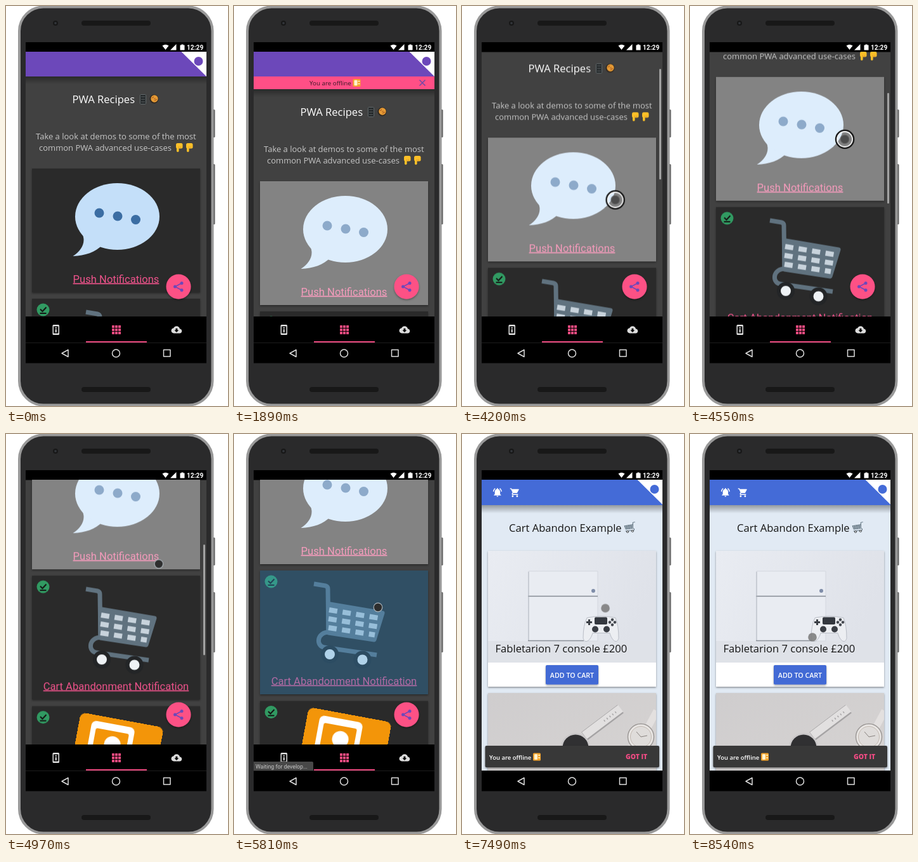
Recreate the animation shown at these times as an HTML page. Size 350 px wide and 630 px high, loop 8610 ms.

```html
<!DOCTYPE html>
<html lang="en">
<head>
<meta charset="utf-8">
<title>PWA Recipes demo</title>
<style>
html, body { margin: 0; width: 100%; height: 100%; overflow: hidden; background: #fff; }
svg { display: block; width: 350px; height: 630px; }
text { font-family: "Open Sans", "Noto Sans", sans-serif; }
.roboto { font-family: Roboto, Arial, sans-serif; }
.title { font-size: 16.6px; }
.para { font-size: 13px; fill: #c6c6c6; }
.small { font-size: 9.8px; }
.label {
  font-size: 16.6px; fill: #ee538b; text-anchor: middle;
  text-decoration: underline; text-decoration-color: #6350dc;
}

/* One 8610 ms clock drives every part. */
.anim { animation: 8610ms linear infinite; }
.push { animation-name: push; }
.banner { animation-name: banner; }
.dim { animation-name: dim; }
.scroll { animation-name: scroll; }
.thumb { animation-name: thumb; }
.bar { animation-name: bar; }
.press { animation-name: press; }
.tip { animation-name: tip; }
.shop { animation-name: shop; }
.snack { animation-name: snack; }
.cursor { animation-name: cursor; }
.ring { animation-name: ring; }
.dot { animation-name: dot; }
.press, .tip, .shop, .ring, .dot { animation-timing-function: step-end; }

@keyframes push {
  0%, 9.76% { transform: translateY(0); animation-timing-function: ease-out; }
  13.01%, 100% { transform: translateY(20px); }
}
@keyframes banner {
  0%, 9.76% { transform: translateY(-20px); animation-timing-function: ease-out; }
  13.01%, 100% { transform: translateY(0); }
}
@keyframes dim {
  0%, 9.76% { opacity: 0; }
  13.01%, 100% { opacity: .42; }
}
@keyframes scroll {
  0%, 43.9% { transform: translateY(0); animation-timing-function: cubic-bezier(.4, 0, .7, .75); }
  52.85% { transform: translateY(-164px); animation-timing-function: cubic-bezier(.2, .6, .4, 1); }
  60.98%, 100% { transform: translateY(-266px); }
}
@keyframes thumb {
  0%, 43.9% { transform: translateY(0); animation-timing-function: cubic-bezier(.4, 0, .7, .75); }
  52.85% { transform: translateY(65px); animation-timing-function: cubic-bezier(.2, .6, .4, 1); }
  60.98%, 100% { transform: translateY(105.5px); }
}
@keyframes bar {
  0%, 43.9% { opacity: 0; }
  44.7%, 60.98% { opacity: 1; }
  63.9%, 100% { opacity: 0; }
}
@keyframes press { 0% { opacity: 0; } 65.85%, 100% { opacity: 1; } }
@keyframes tip { 0% { opacity: 0; } 65.85% { opacity: 1; } 80.5%, 100% { opacity: 0; } }
@keyframes shop { 0% { visibility: hidden; } 70.73%, 100% { visibility: visible; } }
@keyframes snack {
  0%, 71.5% { transform: translateY(44px); animation-timing-function: ease-out; }
  74.1%, 100% { transform: translateY(0); }
}
@keyframes cursor {
  0%, 36.58% { transform: translate(302px, 400px); opacity: 0; }
  36.6% { transform: translate(302px, 400px); opacity: 1; animation-timing-function: ease-out; }
  41.46% { transform: translate(208px, 355px); animation-timing-function: ease-in-out; }
  43.9% { transform: translate(240px, 374px); animation-timing-function: cubic-bezier(.4, 0, .7, .75); }
  52.85% { transform: translate(244px, 210px); animation-timing-function: ease-out; }
  55.3% { transform: translate(245px, 184px); animation-timing-function: ease-in-out; }
  62.6%, 85.9% { transform: translate(227px, 273px); animation-timing-function: ease-in-out; }
  95.1%, 100% { transform: translate(193px, 320px); opacity: 1; }
}
@keyframes ring { 0% { opacity: 0; } 43.9% { opacity: 1; } 54.4%, 100% { opacity: 0; } }
@keyframes dot {
  0% { fill: rgba(68, 72, 80, .8); stroke: #4a5059; }
  43.9% { fill: rgba(70, 70, 70, .9); stroke: #666; }
  54.4% { fill: #2e2e2e; stroke: #aab2b8; }
  70.73%, 100% { fill: rgba(120, 120, 120, .85); stroke: transparent; }
}
</style>
</head>
<body>
<svg viewBox="0 0 350 630">
<defs>
  <clipPath id="screen"><rect x="31" y="72.5" width="285" height="458"/></clipPath>
  <clipPath id="column"><rect x="41" y="184" width="265" height="350"/></clipPath>
  <linearGradient id="shade" x2="0" y2="1">
    <stop stop-opacity=".35"/><stop offset="1" stop-opacity="0"/>
  </linearGradient>
  <linearGradient id="wall" x2="1" y2=".3">
    <stop stop-color="#e9ecf2"/><stop offset="1" stop-color="#dfe2e9"/>
  </linearGradient>
  <linearGradient id="desk" x2="1" y2="1">
    <stop stop-color="#cfcdce"/><stop offset="1" stop-color="#d6d3d2"/>
  </linearGradient>
  <filter id="soft" x="-20%" y="-20%" width="140%" height="150%">
    <feDropShadow dx="0" dy="1.5" stdDeviation="1.5" flood-opacity=".4"/>
  </filter>

  <g id="card"><rect x="41" width="265" height="195" fill="#2c2c2c" filter="url(#soft)"/></g>

  <g id="badge">
    <circle cx="58.5" cy="17.5" r="10" fill="#319a62"/>
    <path d="M54 16.5l3.5 3.5 6-6.5M53.500 23h10" fill="none" stroke="#151515" stroke-width="2"/>
  </g>

  <g id="hand" fill="#fcc028">
    <rect x="-5" y="-7" width="10.5" height="8.5" rx="2.5"/>
    <rect x="-4" y="-3" width="3.6" height="10" rx="1.8"/>
    <path d="M-.4 1.5V-2M2.4 1.5V-2" stroke="#d8932a" stroke-width=".8"/>
  </g>

  <g id="off">
    <rect x="-6" y="-6" width="12" height="12" rx="1.5" fill="#f5a32b"/>
    <rect x="-4" y="-4.2" width="5" height="8.4" rx="1" fill="#fff3cf"/>
    <path d="M2 -2.5h3M2 1.5h3" stroke="#fff3cf" stroke-width="1.6"/>
  </g>

  <path id="trolley" d="M7 18c-1.1 0-1.99.9-1.99 2S5.9 22 7 22s2-.9 2-2-.9-2-2-2zM1 2v2h2l3.6 7.59-1.35 2.45c-.16.28-.25.61-.25.96 0 1.1.9 2 2 2h12v-2H7.42c-.14 0-.25-.11-.25-.25l.03-.12.9-1.63h7.45c.75 0 1.41-.41 1.75-1.03l3.58-6.49A1 1 0 0 0 20 4H5.21l-.94-2H1zm16 16c-1.1 0-1.99.9-1.99 2s.89 2 1.99 2 2-.9 2-2-.9-2-2-2z"/>

  <!-- Large cart picture, y measured from the top of its card -->
  <g id="cart" fill="none" stroke="#60727f" stroke-linejoin="round">
    <path d="M126 21l18 3q4 1 4 5l1 70" stroke-width="7"/>
    <path d="M148.500 52.500L234 67 221 109 149 98z" fill="#60727f" stroke-width="7"/>
    <path d="M150 97C130 97 129 119 142 121L225 133" stroke-width="7"/>
    <g stroke="#c8d3dc" stroke-width="8" stroke-dasharray="13 8.5">
      <path d="M150 62l79 13M149 76l77 12.500M149 90l73 11.500"/>
    </g>
    <g fill="#eef2f5" stroke="#232527" stroke-width="6">
      <circle cx="151" cy="132" r="11"/><circle cx="202.500" cy="140.500" r="11"/>
    </g>
  </g>
</defs>

<!-- Handset -->
<g fill="#626262">
  <rect x="325" y="163" width="4.500" height="44" rx="1.500"/>
  <rect x="325" y="249" width="4.500" height="95" rx="1.500"/>
</g>
<rect x="21" y="1.5" width="304.5" height="627" rx="38" fill="#2a2a2b" stroke="#999" stroke-width="4"/>
<g fill="#181818">
  <rect x="119" y="23" width="109" height="8" rx="4"/>
  <rect x="119" y="600" width="109" height="8" rx="4"/>
  <circle cx="78" cy="27" r="4"/>
</g>
<circle cx="78" cy="27" r="1.8" fill="#34373d"/>
<rect x="31" y="57" width="285" height="505.5"/>

<g clip-path="url(#screen)">
  <!-- Recipe list -->
  <rect x="31" y="72" width="286" height="417" fill="#414141"/>
  <g class="anim scroll">
    <g class="anim push">
      <rect x="31" y="111" width="286" height="12" fill="url(#shade)"/>
      <text class="title" x="104.5" y="152.5" fill="#fff">PWA Recipes</text>
      <rect x="211.5" y="139.5" width="9" height="15" rx="1" fill="#24282a" stroke="#626a6c"/>
      <path d="M213.5 143h5M213.5 147h5M213.5 151h5" stroke="#788082" stroke-width="1.2" stroke-dasharray="2 1"/>
      <circle cx="233.5" cy="146.5" r="7" fill="#302820"/>
      <circle cx="234" cy="146" r="5.7" fill="#e69b35"/>
      <path d="M230 145l3-2M234 149l4-2M233 146h3" stroke="#a95c22" stroke-width="1.2"/>
      <text class="para" x="47" y="209.5">Take a look at demos to some of the most</text>
      <text class="para" x="52" y="227.5">common PWA advanced use-cases</text>
      <use href="#hand" x="273" y="223"/><use href="#hand" x="289" y="223"/>

      <g transform="translate(0 256)">
        <use href="#card"/>
        <g fill="#c4dff9">
          <path d="M116 96C129 112 121 128 105.500 138 125 137 141 132 152 120z"/>
          <ellipse cx="175.500" cy="75.500" rx="66.500" ry="52.500"/>
        </g>
        <g fill="#3b6da3">
          <circle cx="147" cy="70" r="7.500"/><circle cx="176" cy="75" r="7.500"/><circle cx="204.500" cy="80.500" r="7.500"/>
        </g>
        <text class="label roboto" x="173.500" y="179.500">Push Notifications</text>
        <rect class="anim dim" x="41" width="265" height="195" fill="#fff"/>
      </g>

      <g transform="translate(0 461)">
        <use href="#card"/><use href="#badge"/><use href="#cart"/>
        <text class="label roboto" x="173.500" y="179.500">Cart Abandonment Notification</text>
        <rect class="anim press" x="41" width="265" height="195" fill="rgba(60,150,210,.35)"/>
      </g>

      <g transform="translate(0 666.500)">
        <use href="#card"/><use href="#badge"/>
        <g transform="translate(118 9.500) rotate(10.500)">
          <rect width="133" height="120" rx="9" fill="#f39509"/>
          <rect x="20" y="9" width="69" height="105" rx="8" fill="#fff"/>
          <rect x="28" y="20" width="53" height="84" rx="3" fill="#f39509"/>
          <circle cx="58" cy="41" r="13" fill="#fff"/>
        </g>
      </g>
    </g>

    <g class="anim banner">
      <rect x="31" y="111" width="286" height="20" fill="#ff4f86"/>
      <text class="small" x="119" y="124.500" fill="#3a1826">You are offline</text>
      <use href="#off" x="193.500" y="121"/>
      <path d="M292.500 116.500l9 9m0-9l-9 9" stroke="#6d48a8" stroke-width="1.500"/>
    </g>
    <rect x="31" y="72" width="286" height="39" fill="#6c48ba"/>
    <path d="M276.500 72h40v39.500z" fill="#fff"/>
    <circle cx="303.500" cy="87" r="7" fill="#6c48ba"/>
  </g>

  <g class="anim bar">
    <rect class="anim thumb" x="311" y="72" width="3" height="174" rx="1" fill="#a3a3a3"/>
  </g>

  <circle cx="272" cy="442" r="19.500" fill="#fd5185" filter="url(#soft)"/>
  <path d="M277 436.500l-10.500 5.500 10.500 5.500" fill="none" stroke="#6c48ba" stroke-width="1.500"/>
  <g fill="#6c48ba">
    <circle cx="277" cy="436.500" r="2.500"/><circle cx="266.500" cy="442" r="2.500"/><circle cx="277" cy="447.500" r="2.500"/>
  </g>

  <!-- Tabs -->
  <rect x="31" y="489" width="286" height="42"/>
  <rect x="73.500" y="502" width="10.500" height="16" rx="1.500" fill="#e4e4e4"/>
  <rect x="75" y="504.500" width="7.500" height="11"/>
  <path d="M78.750 506v2m0 1v5" stroke="#e4e4e4" stroke-width="2"/>
  <path d="M167 505h14M167 510h14M167 515h14" stroke="#f04b80" stroke-width="4" stroke-dasharray="4 1"/>
  <path transform="translate(260.500 501.500) scale(.7)" fill="#ddd" d="M19.350 10.040C18.670 6.590 15.640 4 12 4 9.110 4 6.600 5.640 5.350 8.040 2.340 8.360 0 10.910 0 14c0 3.310 2.690 6 6 6h13c2.760 0 5-2.240 5-5 0-2.640-2.050-4.780-4.650-4.960zM17 13l-5 5-5-5h3V9h4v4h3z"/>
  <path d="M126 529h96" stroke="#ed4a80" stroke-width="2"/>

  <!-- Shop page -->
  <g class="anim shop">
    <rect x="31" y="72" width="286" height="459" fill="#e1eaf4"/>
    <rect x="31" y="112" width="286" height="13" fill="url(#shade)"/>
    <rect x="31" y="72" width="286" height="40" fill="#446bd7"/>
    <path d="M276.500 72h40v39.500z" fill="#fff"/>
    <circle cx="303.500" cy="87" r="7" fill="#446bd7"/>
    <g fill="#fff">
      <path transform="translate(47.500 83.500) scale(.7)" d="M7.580 4.080L6.150 2.650C3.750 4.480 2.170 7.300 2.030 10.500h2c.150-2.650 1.510-4.970 3.550-6.420zm12.390 6.420h2c-.150-3.200-1.730-6.020-4.120-7.850l-1.420 1.430c2.020 1.450 3.390 3.770 3.540 6.420zM18 11c0-3.070-1.640-5.640-4.500-6.320V4c0-.830-.670-1.500-1.500-1.500s-1.500.670-1.500 1.500v.680C7.630 5.360 6 7.920 6 11v5l-2 2v1h16v-1l-2-2v-5zm-6 11a2 2 0 0 0 2-2h-4a2 2 0 0 0 2 2z"/>
      <use href="#trolley" transform="translate(75 84) scale(.7)"/>
    </g>
    <text class="title" x="74" y="153.500" fill="#161616">Cart Abandon Example</text>
    <use href="#cart" transform="translate(292 136) scale(-.153 .128)"/>

    <rect x="41" y="184" width="265" height="214" fill="#fff" filter="url(#soft)"/>
    <rect x="41" y="408" width="265" height="130" fill="url(#desk)" filter="url(#soft)"/>
    <g clip-path="url(#column)">
      <rect x="41" y="184" width="265" height="176" fill="url(#wall)"/>
      <path d="M41 326h265v34H41z" fill="#dfe2e8"/>
      <path d="M105 216h109v110H105z" fill="#e9ecf2" stroke="#d3d7df"/>
      <path d="M104 255.500h110" stroke="#858a93" stroke-width="1.500"/>
      <path d="M105 217v108" stroke="#b3b8c1"/>
      <path d="M104 325.500h88" stroke="#8d929a" stroke-width="1.500"/>
      <circle cx="207" cy="247" r="3" fill="#7f8da9"/>
      <path d="M197 289.500q22-5 45 0 5 12 5 32c-2 9-10 6-14-8h-27c-4 14-13 17-15 8q0-20 6-32z" fill="#eceef2" stroke="#b9bdc6"/>
      <rect x="209" y="288.500" width="20" height="11.500" rx="2" fill="#34383f"/>
      <g fill="#393d44">
        <circle cx="210" cy="307.500" r="5"/><circle cx="228" cy="307.500" r="5"/>
      </g>
      <path d="M196 296.500h9m-4.500-4.500v9" stroke="#3b3f46" stroke-width="3"/>
      <g fill="#42464d">
        <circle cx="237" cy="292.500" r="2.200"/><circle cx="237" cy="300.500" r="2.200"/>
        <circle cx="233" cy="296.500" r="2.200"/><circle cx="241" cy="296.500" r="2.200"/>
      </g>

      <!-- Watches -->
      <g fill="none">
        <path d="M193 476l57-43" stroke="#a5a3a4" stroke-width="16"/>
        <path d="M193 475l57-43" stroke="#e2e0e0" stroke-width="13"/>
        <path d="M224 452l20-15" stroke="#a9a7a8" stroke-width="3" stroke-dasharray="1.500 4"/>
        <path d="M292 464l15-28M271 490l-19 16" stroke="#e3e0df" stroke-width="11"/>
      </g>
      <circle cx="179" cy="494" r="23" fill="#c9c7c8"/>
      <circle cx="179" cy="494" r="20.500" fill="#303032"/>
      <circle cx="282" cy="477" r="20.500" fill="#e9e6e4" stroke="#9c9896" stroke-width="1.500"/>
      <circle cx="282" cy="477" r="16.500" fill="#dfdcda" stroke="#c2b9b1"/>
      <path d="M282 477l-7-8m7 8l10-2" stroke="#88827f"/>
    </g>
    <text class="title" x="52.500" y="344" fill="#161616">Fabletarion 7 console £200</text>
    <rect x="132" y="364" width="83" height="30.500" rx="2" fill="#426ad5" filter="url(#soft)"/>
    <text x="173.500" y="383.500" font-size="10.700" font-weight="600" fill="#fff" text-anchor="middle">ADD TO CART</text>

    <g class="anim snack">
      <rect x="36.500" y="491" width="274.500" height="34" rx="2" fill="#393939" filter="url(#soft)"/>
      <text x="43" y="512.500" font-size="9.500" font-weight="600" fill="#fff">You are offline</text>
      <use href="#off" x="118" y="508.500"/>
      <text x="258" y="512" font-size="10.400" font-weight="800" fill="#f04b83">GOT IT</text>
    </g>
  </g>

  <g class="anim tip">
    <path d="M31 516h92q2 0 2 2v13H31z" fill="#484848"/>
    <text class="roboto" x="34" y="526.500" font-size="8.750" fill="#c9c9c9">Waiting for develop...</text>
  </g>
</g>

<!-- System bars -->
<path d="M31 530.500h285" stroke="#1c1c1c"/>
<g fill="#fff">
  <path d="M246.500 62.500q5-3.500 10 0l-5 6.500z"/>
  <path d="M268.500 60v9.500h-9.500z"/>
  <path d="M274.500 61.500h2v-1h3v1h2v8h-7z"/>
  <text class="roboto" x="285" y="69" font-size="10.200" font-weight="700" fill="#fff">12:29</text>
</g>
<g fill="none" stroke="#dedede" stroke-width="1.500" stroke-linejoin="round">
  <path d="M98 541.500v11l-10-5.500z"/>
  <circle cx="173.500" cy="547" r="6"/>
  <rect x="248.500" y="541.500" width="10.500" height="10.500"/>
</g>

<g class="anim cursor">
  <g class="anim ring" fill="none">
    <circle r="14" stroke="#111" stroke-width="2.500"/>
    <circle r="12" stroke="#f4f4f4" stroke-width="1.800"/>
  </g>
  <circle class="anim dot" r="6.800" stroke-width="1.200"/>
</g>
</svg>
</body>
</html>
```
